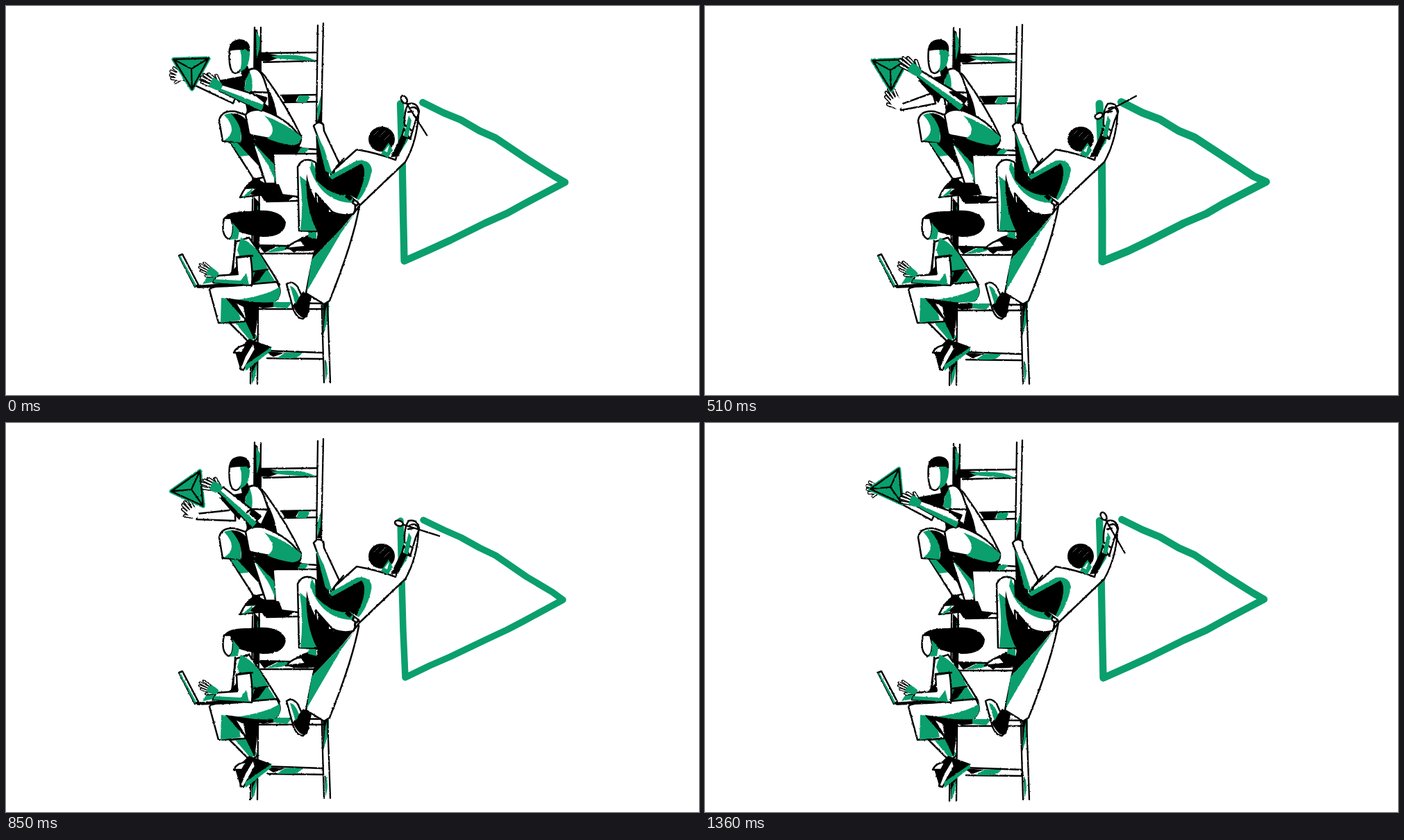
Recreate the animation shown at these times as an HTML page. Size 998x561 px, loop 1530 ms.

```html
<!DOCTYPE html>
<html lang="en">
<head>
<meta charset="utf-8">
<title>Ladder crew</title>
<style>
html, body { margin: 0; width: 100%; height: 100%; overflow: hidden; background: #fff; }
svg { display: block; width: 100vw; height: 100vh; }
path, ellipse { stroke-linecap: round; stroke-linejoin: round; }
.k { fill: #000; }
.g { fill: #0a9f6c; }
.w { fill: #fff; }
.l { fill: none; stroke: #000; stroke-width: 2.3; }
.o { fill: #fff; stroke: #000; stroke-width: 2.5; }
.paint { fill: none; stroke: #0a9f6c; }
.rim { fill: #0a9f6c; stroke: #0a9f6c; stroke-width: 6; }
.fleck { fill: none; stroke: #777; stroke-width: .8; }
.ink { fill: none; stroke: #000; stroke-width: 5.6; }
.skin { fill: none; stroke: #fff; stroke-width: 2.4; }
</style>
</head>
<body>
<svg viewBox="0 0 998 561">
<defs>
  <filter id="chalk" filterUnits="userSpaceOnUse" x="0" y="0" width="998" height="561" color-interpolation-filters="sRGB">
    <feTurbulence id="grain" type="fractalNoise" baseFrequency=".28" numOctaves="2"/>
    <feDisplacementMap in="SourceGraphic" scale="2.2" xChannelSelector="R" yChannelSelector="G"/>
  </filter>
  <path id="fingers" d="M11-6L23-10M13-2L27-4M13 2L26 2M12 6L22 7M4 5L13 12"/>
  <g id="hand">
    <use href="#fingers" class="ink"/>
    <use href="#fingers" class="skin"/>
    <path d="M-1-5Q8-10 14-8L15 7Q6 9-1 5Z"/>
  </g>
</defs>

<path id="triangle" class="paint"/>

<g filter="url(#chalk)">
  <g id="ladder">
    <path class="k" d="M357 32L362 35Q366 58 368 70V95H358ZM357 275L366 285L363 350H356ZM353 500L362 490V515L354 545Z"/>
    <path class="g" d="M360 36L367 48Q365 65 361 76ZM362 285Q368 308 364 330L361 328ZM354 545Q361 535 361 515L355 528Z"/>
    <path class="k" d="M448 168L453 130L455 168ZM448 182L465 230V330H451ZM456 418H466L463 450L457 474ZM459 510L462 515L460 542Z"/>
    <path class="g" d="M449 165Q455 150 454 130L448 148ZM457 470Q466 455 465 420L460 440ZM460 540Q466 525 460 509Z"/>
    <path class="l" d="M358 30L352 545M367 31L362 545M449 28L447 168L458 543M457 25L454 168L467 543"/>
    <path class="l" d="M366 68L448 67M371 81L447 79M396 129L447 128M400 139L448 138M388 203L450 207M385 213L448 213M395 272L420 275M375 282L420 281"/>
    <path class="l" d="M364 345L445 347M366 357L447 357M362 428L458 429M363 437L456 437M372 497L456 500M376 508L457 509"/>
    <path class="k" d="M366 67L400 72L378 80L366 79ZM396 129H422L416 139H402ZM378 200L426 203L420 212L386 213ZM365 270L415 274L405 282L372 281Z"/>
    <path class="k" d="M364 346H392L372 356ZM405 348H425L415 356ZM352 430L380 426L410 431L370 436ZM372 498L402 500L385 506Z"/>
    <path class="g" d="M382 72Q425 67 447 79Q410 78 388 75ZM422 129H436Q438 134 432 139H418ZM424 205H437L430 212H420Z"/>
    <path class="g" d="M392 347H412Q402 355 376 355ZM385 427H412L405 436L385 434ZM402 500H427Q422 507 412 508H390Z"/>
  </g>

  <g id="reader">
    <path id="farArm" class="o"/>
    <g id="farHand"><use href="#hand" class="w"/></g>
    <path class="k" d="M307 107L345 100V122L336 140L320 122Z"/>
    <path class="o" d="M322 195L357 250L371 247L352 196Z"/>
    <path class="g" d="M322 195L337 217L362 214L353 196Z"/>
    <path class="k" d="M332 196L356 198L367 234Z"/>
    <path class="o" d="M356 200L374 256H388L384 205Z"/>
    <path class="k" d="M352 190L386 205L385 240Z"/>
    <path class="g" d="M357 198L386 228L389 255L378 230Z"/>
    <path class="o" d="M337 276Q345 258 358 250L372 258L362 273Z"/>
    <path class="k" d="M345 264L358 247L374 256L366 263ZM350 271Q360 262 372 255L393 257L399 272Q370 277 350 271Z"/>
    <path class="g" d="M339 277L356 262L352 272Z"/>
    <path class="o" d="M307 165Q310 150 330 152L345 157L356 197L312 195Z"/>
    <path class="g" d="M314 157Q330 150 340 162L338 197L314 194Q336 180 314 157Z"/>
    <path class="k" d="M324 155Q350 152 358 197L338 197Q343 176 324 155Z"/>
    <path class="o" d="M345 95Q358 84 372 100Q405 145 425 188L420 200L350 160L342 120Z"/>
    <path class="k" d="M368 104Q388 130 391 164L345 158L354 118Z"/>
    <path class="o" d="M349 93Q362 84 371 104L378 125L352 124Z"/>
    <path class="g" d="M348 90Q357 102 354 124L343 122Z"/>
    <path class="o" d="M345 157Q352 147 372 151Q410 165 425 192Q424 204 410 208L384 210L350 184Z"/>
    <path class="k" d="M348 184L380 190L425 197Q422 207 408 209L384 213Z"/>
    <path class="g" d="M372 158Q404 170 425 188Q426 200 412 201Q392 198 376 191Q394 180 372 158Z"/>
    <path class="k" d="M338 92L348 86L351 95L342 112Z"/>
    <path class="o" d="M322 62Q320 86 326 95Q334 101 340 88L342 62Z"/>
    <path class="g" d="M337 63H351Q352 80 345 90L336 96Q342 80 337 63Z"/>
    <path class="k" d="M321 65Q321 49 337 48Q353 49 351 66L346 63Q335 62 321 65Z"/>
    <path id="prismRim" class="rim"/>
    <path id="prismEdges" class="l"/>
    <path id="nearArm" class="o"/>
    <path id="nearShade" class="g"/>
    <g id="nearHand"><use href="#hand" class="g"/></g>
  </g>

  <g id="typist">
    <path class="o" d="M322 457L352 487L362 480L345 455Z"/>
    <path class="g" d="M330 457L345 455L362 478L352 483Z"/>
    <path class="o" d="M331 340L350 334Q375 370 394 402L350 408L325 388Z"/>
    <path class="g" d="M338 334Q365 347 378 382L391 402L352 403L333 352Z"/>
    <path class="k" d="M352 402L359 383L374 382L364 396Z"/>
    <path class="o" d="M293 409Q295 404 320 404L390 398Q400 414 388 425L350 427L344 455L306 457Z"/>
    <path class="g" d="M330 424Q375 418 394 405Q398 420 386 427Q360 429 330 424ZM310 421L330 423L338 453L309 457Z"/>
    <path class="k" d="M316 421L365 428L358 482L344 453Z"/>
    <path class="w" d="M332 429L342 434L345 450Z"/>
    <path class="k" d="M330 499L350 480L383 492L350 518L338 526Z"/>
    <path class="o" d="M328 500Q332 490 346 489L340 500ZM337 523L344 505L356 485L359 495L342 525Z"/>
    <path class="g" d="M345 526L382 497V492L344 518Z"/>
    <path class="o" d="M249 360L254 358L277 402L272 405Z"/>
    <path class="g" d="M249 361L251 360L275 404L272 405Z"/>
    <path class="k" d="M272 403L345 398L340 404L276 407Z"/>
    <path class="g" d="M283 401L293 385L304 397Z"/>
    <path class="o" d="M332 362L352 360Q356 385 354 403L298 399L303 389L333 387Z"/>
    <path class="g" d="M300 394L338 396L346 385L350 402L298 399Z"/>
    <path class="k" d="M321 387L333 374L335 387Z"/>
    <path class="l" d="M333 363L355 360M356 383L377 380M330 338L327 382"/>
    <g id="typeHand"><use href="#hand" class="g"/></g>
    <path class="k" d="M314 306Q320 295 350 296Q395 290 403 312Q402 333 370 333Q345 330 334 325L322 308Z"/>
    <path class="o" d="M314 306Q309 330 320 336Q327 336 327 318L324 306Z"/>
    <path class="g" d="M326 312L336 324L334 336L322 337Q329 328 326 312Z"/>
  </g>

  <g id="painter">
    <path class="k" d="M447 182L466 228L464 255L452 250Z"/>
    <path class="o" d="M443 173Q450 164 457 171L458 180L480 227L468 243L455 205Z"/>
    <path class="g" d="M446 182L458 205L470 243L460 238L452 206Z"/>
    <path class="o" d="M574 172Q573 150 580 141Q592 138 595 152L588 182Z"/>
    <path class="o" d="M505 207Q535 212 561 222L573 177L582 192L590 165L594 156Q592 195 575 225L510 287L470 255L473 236Z"/>
    <path class="g" d="M572 190L580 158L584 165L578 195L565 216Z"/>
    <path class="k" d="M554 218L570 185L577 191L565 217Z"/>
    <path class="l" d="M570 188L583 192M473 236L486 220"/>
    <ellipse class="k" cx="541" cy="192" rx="19" ry="18"/>
    <path class="g" d="M540 213L551 197L557 208L550 219Z"/>
    <path class="w" d="M545 209L552 200L549 211Z"/>
    <path class="fleck" d="M530 186L536 180M538 188L546 180M545 193L552 186"/>
    <path class="g" d="M462 247L505 223Q524 220 527 236Q522 264 508 280L470 257Z"/>
    <path class="k" d="M468 251L512 227Q523 240 505 278L485 267Z"/>
    <path class="k" d="M404 350Q420 334 436 330L447 335V352Q420 356 404 350Z"/>
    <path class="o" d="M403 350Q415 338 425 338L432 347Z"/>
    <path class="g" d="M436 324H447V336L435 333Z"/>
    <path class="o" d="M446 300L470 298L500 300L509 288Q500 340 466 425L458 430L432 414Q440 370 450 330Z"/>
    <path class="k" d="M446 290Q470 305 502 298L484 320L440 366Q455 330 446 290Z"/>
    <path class="g" d="M502 300L484 320L440 366L433 412Q448 386 482 328Z"/>
    <path class="o" d="M420 232Q428 216 445 225L475 258L500 278Q506 292 500 300Q485 304 470 297L446 270L449 325L422 324Z"/>
    <path class="g" d="M440 222Q450 255 497 273L503 284Q455 285 438 235ZM423 245L436 255Q445 290 447 324H424Q429 285 423 245Z"/>
    <path class="k" d="M445 225L468 252L498 272Q470 277 446 250ZM433 242Q440 280 462 298L448 325Q430 290 433 242Z"/>
    <path class="k" d="M482 262L489 268L485 273L478 267ZM492 270L499 276L495 281L488 275Z"/>
    <path class="o" d="M501 279L508 284L505 288L499 284Z"/>
    <path class="o" d="M404 401Q412 395 420 405L436 440L428 451Q420 452 414 438Z"/>
    <path class="k" d="M413 432L428 412L440 420L434 448Q424 455 413 432Z"/>
    <path class="g" d="M409 404Q416 404 422 420L417 430Z"/>
    <g id="brush">
      <path class="l" d="M-18 0H43"/>
      <ellipse class="o" cx="-18" rx="6" ry="3.8"/>
    </g>
    <path class="l" d="M594 154Q592 142 581 148M586 152L579 153"/>
  </g>
</g>
</svg>

<script>
const STEP = 170, STEPS = 9, TURN = 2 * Math.PI;

const set = (id, attrs) => {
  for (const name in attrs) document.getElementById(id).setAttribute(name, attrs[name]);
};

// Smooth swing over one loop, 1 at the given step
const wave = (step, peak) => Math.cos(TURN * (step - peak) / STEPS);

// Limb between two joints, from half-width a to half-width b
function limb(x1, y1, x2, y2, a, b) {
  const length = Math.hypot(x2 - x1, y2 - y1);
  const nx = (y1 - y2) / length, ny = (x2 - x1) / length;
  return `M${x1 + nx * a} ${y1 + ny * a}L${x2 + nx * b} ${y2 + ny * b}` +
    `L${x2 - nx * b} ${y2 - ny * b}L${x1 - nx * a} ${y1 - ny * a}Z`;
}

// Hand at a wrist, with its fingertips at (dx, dy) from it
function placeHand(id, x, y, dx, dy, width) {
  const angle = Math.atan2(dy, dx) * 360 / TURN;
  set(id, { transform: `translate(${x} ${y}) rotate(${angle}) scale(${Math.hypot(dx, dy) / 27} ${width})` });
}

// The prism turns quickly one way for three steps, then slowly back for six
function drawPrism(step) {
  const phase = (step + 2) % STEPS;
  const swing = phase < 3 ? phase / 3 : (STEPS - phase) / 6;
  const cx = 267, cy = 93 + 3 * wave(step, 5.5);
  const corner = i => {
    const angle = (141 + 101 * swing) / 360 * TURN + i * TURN / 3;
    return `${cx + 29 * Math.cos(angle)} ${cy + 29 * Math.sin(angle)}`;
  };
  const [a, b, c] = [0, 1, 2].map(corner);
  const outline = `M${a}L${b}L${c}Z`;
  set('prismRim', { d: outline });
  set('prismEdges', { d: `${outline}M${a}L${cx} ${cy}L${b}M${cx} ${cy}L${c}` });
}

function drawArms(step) {
  const x = 309, y = 106 + 12 * wave(step, -.3);
  const elbow = 367 + 9 * wave(step, 1.5);
  set('nearArm', { d: limb(x, y, elbow, 142, 5, 10) + `M${elbow - 13} 129L353 124L378 125L${elbow + 8} 146` });
  set('nearShade', { d: limb(x - 1, y + 3, elbow - 2, 147, 2, 4.5) });
  placeHand('nearHand', x, y, -25, -16 - 8 * wave(step, 2), .9);

  const reach = wave(step, 3.5);
  const farX = 267 + 15 * reach, farY = 122 + 26 * reach;
  set('farArm', { d: limb(farX, farY, 330, 133, 4, 8) });
  placeHand('farHand', farX, farY, -19, -13 - 11 * reach, -.9);

  placeHand('typeHand', 304, 388, -25, -12 - 3 * wave(step, 2), -.7);
}

function drawBrush(step) {
  const lift = ((1 + wave(step, 3.3)) / 2) ** 2;
  set('brush', { transform: `translate(583 150) rotate(${60 - 90 * lift})` });
}

// The painted line and the ladder jitter between redrawings
function drawJitter(step) {
  const sway = Math.sin(step * TURN / 4);
  const out = 1.5 - 1.5 * sway;
  set('triangle', {
    'stroke-width': 10.3 - .8 * sway,
    d: `M${601 - out / 2} ${140 - out / 2}L630 154L655 ${165 - out / 2}L682 180L705 ${191 - out / 2}` +
      `L750 ${222 - out}L${787 + out} ${244 + out / 2}L${802 + 2 * out} ${255 - out / 2}L745 286L722 ${298 + out / 2}` +
      `L690 313L640 ${337 + out / 2}L610 ${350 + out}L${575 - out} ${367 + out / 2}L572 300L${570 + out / 2} 230L568 141`
  });
  set('ladder', { transform: `translate(0 ${-2 * sway})` });
  set('grain', { seed: step + 1 });
}

let shown = -1;
function tick() {
  const step = Math.floor(performance.now() / STEP) % STEPS;
  if (step !== shown) {
    shown = step;
    [drawPrism, drawArms, drawBrush, drawJitter].forEach(draw => draw(step));
  }
  requestAnimationFrame(tick);
}
tick();
</script>
</body>
</html>
```
